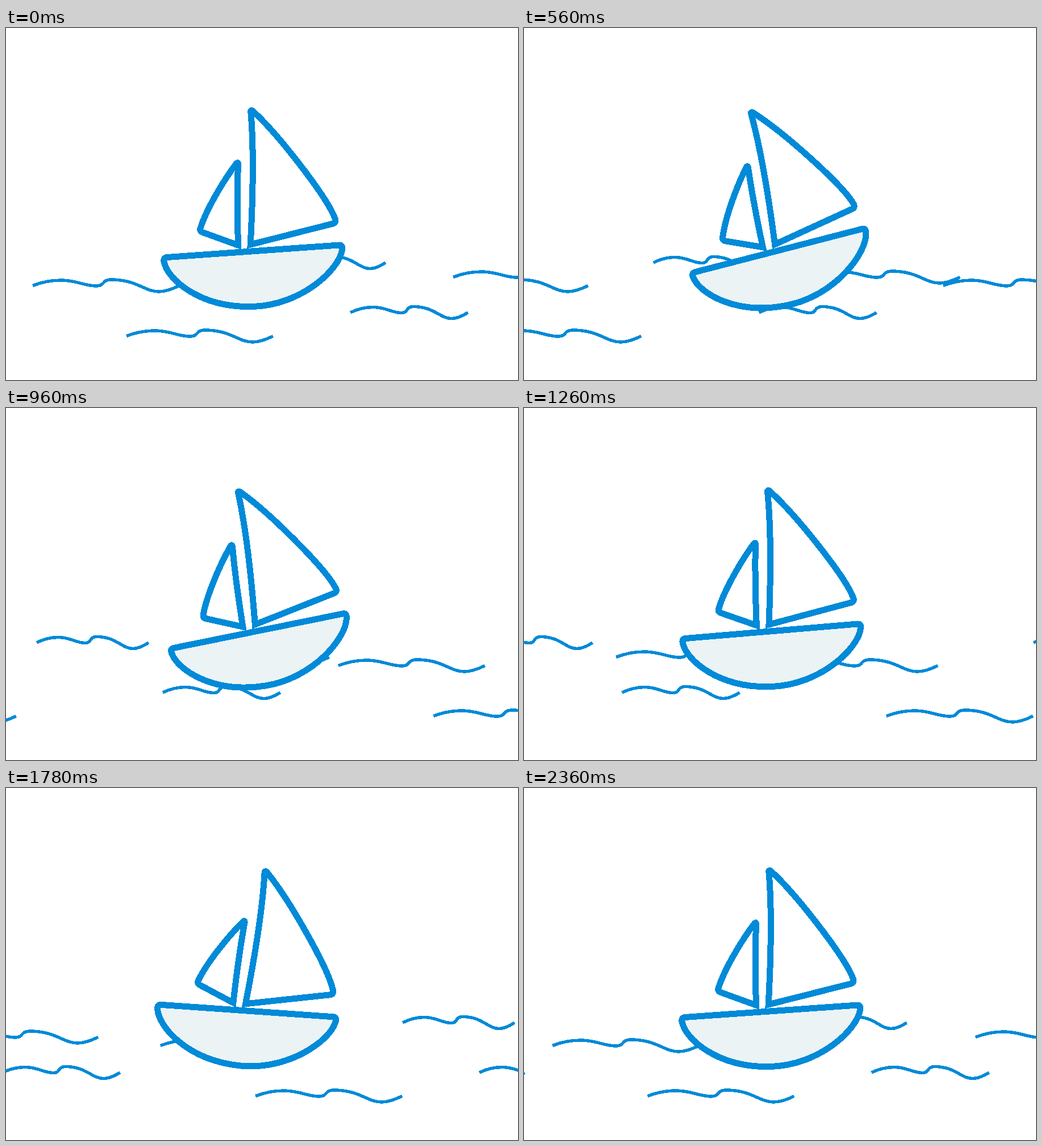
Animation, 901 px wide and 621 px high, one loop 2.38 s. Source, as an HTML page:

```html
<!DOCTYPE html>
<html lang="en">
<head>
<meta charset="utf-8">
<title>Sailing boat</title>
<style>
  html, body { margin: 0; height: 100%; overflow: hidden; background: #fff; }
  svg { display: block; width: 901px; height: 621px; shape-rendering: crispEdges; }
  path { stroke: #008ad8; stroke-width: 5.5; fill: none; vector-effect: non-scaling-stroke; }
  #boat path { stroke-width: 11; fill: #fff; }
  #boat .hull { fill: #ebf3f5; }
</style>
</head>
<body>
<svg viewBox="0 0 901 621">
  <g id="sea"></g>
  <g id="boat">
    <path d="M430.2 382C434 310 437 220 430.8 148C430 145 433 144 437 149C480 189 565 298 579 336Q582 342.5 576 345Z"/>
    <path d="M408.5 383.2C407 330 406.5 290 408.5 240Q408 235 404 241C380 273 352 322 342.5 352Q340 358 345.5 360.3Z"/>
    <path class="hull" d="M284 404.5L586 383Q593 382.5 591.5 391C587 426 520 489 434 491.5C340 494 283 442 278 412Q276.5 405 284 404.5Z"/>
  </g>
</svg>
<script>
const LOOP = 2380, STEP = 20;
const WAVE = 'M0 0C18-7 35-9.5 50-9.5C78-9.5 90 .5 112 .5C128 .5 120-10 138-10.5C184-10.5 196 10.5 222 10.5C236 10.5 248 5 258 0';
const FOLLOW_SPEED = 0.382;

// Each wave leaves at its own speed while a second one follows it in from the right.
const rows = [
  { y: 414, width: 197, x: 471, speed: 0.4345, followX: 1378 },
  { y: 454.5, width: 258, x: 47, speed: 0.343, followX: 951.5 },
  { y: 439.5, width: 258, x: 787, speed: 0.496, followX: 1696 },
  { y: 502, width: 207, x: 606, speed: 0.344, followX: 1513 },
  { y: 543.5, width: 258, x: 212, speed: 0.471, followX: 1119 },
];

const sea = document.getElementById('sea');
const boat = document.getElementById('boat');

function makeWave(x, y, width, speed) {
  const path = document.createElementNS('http://www.w3.org/2000/svg', 'path');
  path.setAttribute('d', WAVE);
  sea.append(path);
  return t => path.setAttribute('transform',
    `translate(${x - speed * t} ${y}) scale(${width / 258} 1)`);
}

const waves = rows.flatMap(r => [
  makeWave(r.x, r.y, r.width, r.speed),
  makeWave(r.followX, r.y, r.width, FOLLOW_SPEED),
]);

// [time, tilt in degrees]
const tilts = [[0, 0], [622, -10.7], [1860, 8.3], [LOOP, 0]];

function tiltAt(t) {
  const i = tilts.findIndex(([time]) => time > t);
  const [t0, a] = tilts[i - 1], [t1, b] = tilts[i];
  return a + (b - a) * (1 - Math.cos(Math.PI * (t - t0) / (t1 - t0))) / 2;
}

function draw() {
  const t = Math.floor(performance.now() / STEP) * STEP % LOOP;
  waves.forEach(move => move(t));
  boat.setAttribute('transform', `rotate(${tiltAt(t)} 434.5 320)`);
  requestAnimationFrame(draw);
}
draw();
</script>
</body>
</html>
```
